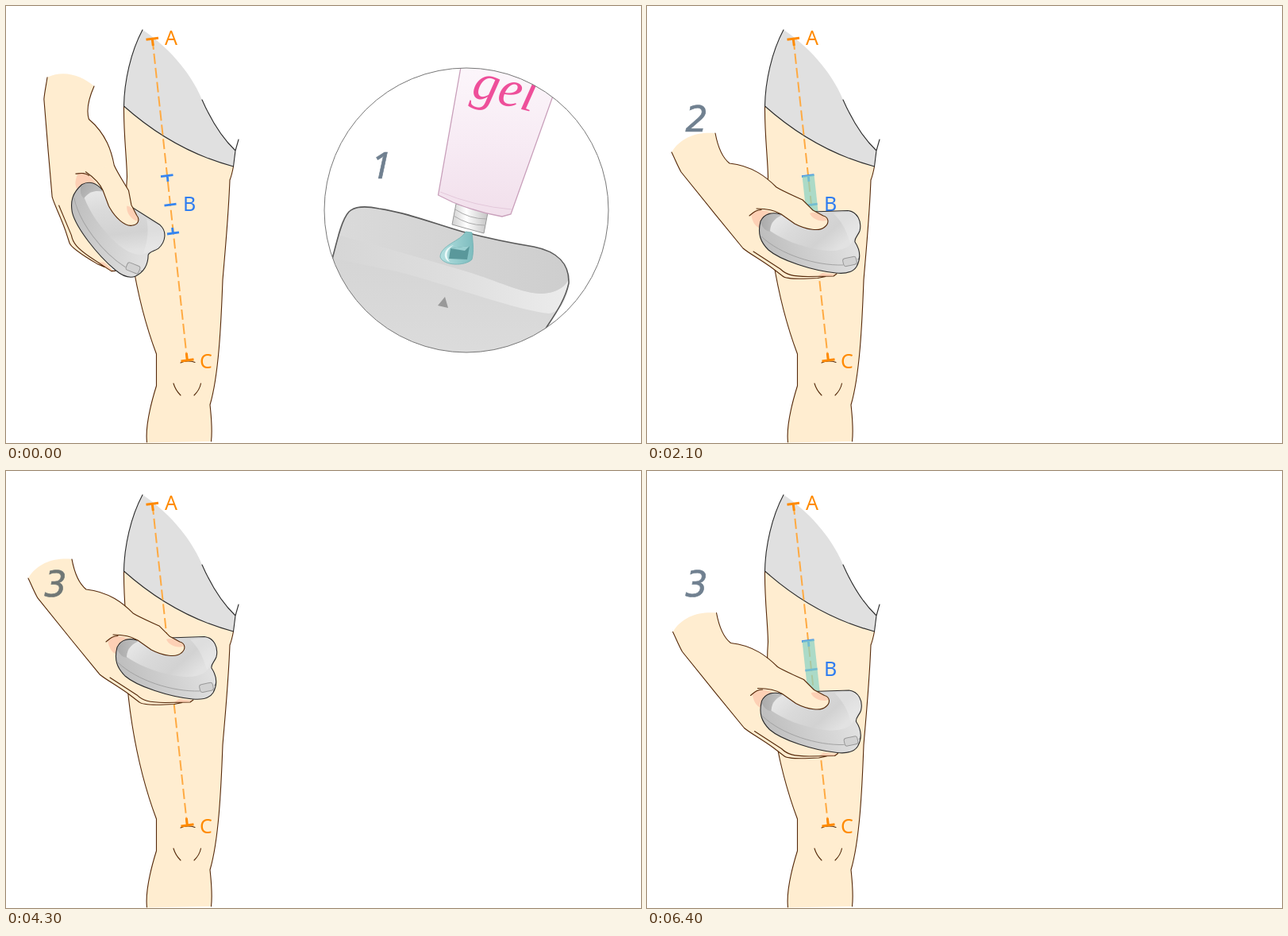
An HTML page that plays this animation: 800 by 550 pixels, repeating every 6500 ms.

```html
<!DOCTYPE html>
<html lang="en">
<head>
<meta charset="utf-8">
<title>Gel application steps</title>
<style>
  html, body { margin: 0; width: 100%; height: 100%; overflow: hidden; background: #fff; }
  svg { display: block; width: 100vw; height: 100vh; }
  .line { fill: none; stroke: #55290a; stroke-width: 1.1; stroke-linecap: round; stroke-linejoin: round; }
  .dark { fill: none; stroke: #2b2b2b; stroke-width: 1.1; stroke-linecap: round; stroke-linejoin: round; }
  .skin { fill: #ffedd0; }
  .pink { fill: #fdd0b5; }
  .label { font: 25px "Noto Sans", "Open Sans", sans-serif; fill: #ff8a00; }
  .digit { font: italic 44px "DejaVu Sans", sans-serif; fill: #708090; stroke: #708090; stroke-width: .7; mix-blend-mode: multiply; }
  .orange { fill: none; stroke: #ff8a00; stroke-width: 3; }
  .blue { fill: none; stroke: #3585f0; stroke-width: 2.8; }
  .rim { fill: none; stroke: #777; stroke-width: 1; }
</style>
</head>
<body>
<svg viewBox="0 0 800 550" preserveAspectRatio="none">
  <defs>
    <clipPath id="lens"><circle cx="580" cy="257" r="179"/></clipPath>
    <linearGradient id="shell" x1="0" x2="1" y1=".6" y2=".4">
      <stop offset="0" stop-color="#bcbcbc"/><stop offset=".5" stop-color="#d0d0d0"/><stop offset="1" stop-color="#e4e4e4"/>
    </linearGradient>
    <linearGradient id="shine" x1="0" x2="1" y1="0" y2=".5">
      <stop offset="0" stop-color="#ececec"/><stop offset=".4" stop-color="#dadada"/>
      <stop offset=".75" stop-color="#d2d2d2"/><stop offset="1" stop-color="#e2e2e2"/>
    </linearGradient>
    <linearGradient id="notch" x1="0" x2="1">
      <stop offset="0" stop-color="#aaa"/><stop offset="1" stop-color="#c4c4c4"/>
    </linearGradient>
    <linearGradient id="tube" x1="0" x2="0" y1="0" y2="1">
      <stop offset="0" stop-color="#fdf8fc"/><stop offset=".55" stop-color="#f7ebf4"/><stop offset="1" stop-color="#f1dfeb"/>
    </linearGradient>
    <linearGradient id="cap" x1="0" x2="1">
      <stop offset="0" stop-color="#d0d0d0"/><stop offset=".4" stop-color="#fff"/><stop offset="1" stop-color="#c4c4c4"/>
    </linearGradient>
    <linearGradient id="top" x1="0" x2="1">
      <stop offset="0" stop-color="#dadada"/><stop offset="1" stop-color="#cecece"/>
    </linearGradient>
    <linearGradient id="band" x1="0" x2="1">
      <stop offset="0" stop-color="#d6d6d6"/><stop offset=".5" stop-color="#dedede"/><stop offset="1" stop-color="#ececec"/>
    </linearGradient>
    <linearGradient id="under" x1="0" x2="0" y1="0" y2="1">
      <stop offset="0" stop-color="#d2d2d2"/><stop offset="1" stop-color="#dcdcdc"/>
    </linearGradient>
    <linearGradient id="drop" x1="0" x2="1">
      <stop offset="0" stop-color="#b4e0e0"/><stop offset="1" stop-color="#7dbcbe"/>
    </linearGradient>
    <linearGradient id="back" x1="0" x2="1" y1="0" y2=".6">
      <stop offset="0" stop-color="#f0f0f0"/><stop offset="1" stop-color="#dedede"/>
    </linearGradient>
    <linearGradient id="face" x1=".6" x2=".4" y1="0" y2="1">
      <stop offset="0" stop-color="#dadada"/><stop offset=".5" stop-color="#e6e6e6"/><stop offset="1" stop-color="#f4f4f4"/>
    </linearGradient>
    <linearGradient id="edge" x1="0" x2="1">
      <stop offset="0" stop-color="#e2e2e2"/><stop offset=".4" stop-color="#f7f7f7"/>
      <stop offset=".75" stop-color="#e0e0e0"/><stop offset="1" stop-color="#f2f2f2"/>
    </linearGradient>
    <linearGradient id="press" x1="0" x2="0" y1="0" y2="1">
      <stop offset="0" stop-color="#b4664e"/><stop offset="1" stop-color="#dfb29f"/>
    </linearGradient>
  </defs>

  <!-- leg -->
  <path class="skin" d="M148.5 126C148 160 152 190 152.5 215C148 270 162 365 189.5 438V478C178 515 176 535 177.5 549.5L258.5 548C260 535 259 520 257 502C268 465 271 400 273 345C275 320 280 270 282 219C284 214 285 210 286.5 202C230 187 185 158.500 148.5 126Z"/>
  <path fill="#e0e0e0" d="M172 30C157 58 149 95 148.5 126C185 158.500 230 187 286.5 202L289 182C272 166 258 143 247 118C232 81 200 48 172 30Z"/>
  <path class="line" d="M148.5 126C148 160 152 190 152.5 215C148 270 162 365 189.5 438V478C178 515 176 535 177.5 549M286.5 202C285 210 284 214 282 219C280 270 275 320 273 345C271 400 268 465 257 502C259 520 260 535 258.5 548"/>
  <path class="line" d="M220 449C225 446.5 233 446.5 238 448.5M211 475C213 482 216 486 220 490M245.5 475C244 483 240 487 237 490"/>
  <path class="dark" d="M172 30C157 58 149 95 148.5 126C185 158.500 230 187 286.5 202L289 182L293 168M289 182C272 166 258 143 247 118"/>

  <!-- measuring line -->
  <path d="M184.5 42L228 444" fill="none" stroke="#ffaa42" stroke-width="2" stroke-dasharray="13 5"/>
  <path class="orange" d="M176.5 42.2L192 40.3M184.3 41.5L185.3 50M220.5 447L236.5 444.8M228.3 445.5L227.3 437"/>
  <path class="blue" d="M195 214.7L210.5 212.7M203.3 214L204 221M199.5 251.2L214.5 249.2M203 287L218 284.8M210.3 286L209.5 279"/>
  <text class="label" x="200" y="49">A</text>
  <text class="label" x="223" y="258" style="fill:#2f7df0">B</text>
  <text class="label" x="244" y="456">C</text>
  <path id="gel" fill="#8bd3c4" fill-opacity=".72"/>

  <!-- hand with device -->
  <g id="hand">
    <path class="skin" d="M28 135C40 115 62 109 83 111C86 127 92 142 101 149C130 152 148 167 160 180L193 195L206 209L200 235L165 255L235 291C215 294 180 296 171 293L155 281C140 270 125 262 118 256C95 228 60 185 40 160C35 151 32 143 28 135Z"/>
    <path class="pink" d="M128 213C132 207 142 206 154 211L148 226L140 231C132 228 130 222 128 213Z"/>
    <path class="pink" d="M212 291L218 287L236 289Q230 292 212 291Z"/>
    <path class="line" d="M28 135C32 143 35 151 40 160C60 185 95 228 118 256C125 262 140 270 155 281L168 291C172 295 196 294.5 212 293.5L222 291.5M131 260L165 282C172 289 180 291.5 200 291.5L232 291L236 288"/>
    <path class="line" d="M126 215C131 211 134 207.5 141 207.5"/>
    <path fill="url(#shell)" d="M205 210L250 208.5C262 210 268 222 265 234C263 240 258 243 259 248C265 257 267 268 261 279C256 287 245 288 235 287C205 284 165 271 150 258C140 248 136 238 140 222C145 212 155 210 165 213Z"/>
    <path fill="url(#notch)" d="M140 224C145 213 155 210 168 213L154 224L152 235Q144 234 140 224Z"/>
    <path fill="url(#shine)" d="M152 234C153 222 160 217 168 214L206 210L249 210C262 213 265 224 262 234C258 242 256 246 255 249C250 257 235 261 216 258C190 254 168 245 152 234Z"/>
    <path fill="#ececec" fill-opacity=".45" d="M232 212L249 210C262 213 265 224 262 234C256 244 257 248 253 250C249 236 244 224 232 212Z"/>
    <path fill="none" stroke="#a3a3a3" d="M141 241C165 264 210 278 244 277M262 270L265 268.5"/>
    <rect x="244" y="267.5" width="17" height="10" rx="3" fill="#d2d2d2" stroke="#999" transform="rotate(-12 252.5 272.5)"/>
    <path class="dark" d="M205 210L250 208.5C262 210 268 222 265 234C263 240 258 243 259 248C265 257 267 268 261 279C256 287 245 288 235 287C205 284 165 271 150 258C140 248 136 238 140 222C145 212 155 210 165 213"/>
    <path class="skin" d="M135 206C150 206 158 208 166 213L183 225C198 233 215 235 221 229C227 224 226 217 219 215L206 208L193 195C180 189 168 184 160 179Z"/>
    <path class="pink" d="M202 212C208 209 219 214 224.5 220C220 223 207 222 202 212Z"/>
    <path class="line" d="M83 111C86 127 92 142 101 149C130 152 148 167 160 179C168 184 180 189 193 195L206 208L219 215C226 217 227 224 221 229C215 235 198 233 183 225L166 213C158 208 150 206 135 206"/>
  </g>
  <text id="digit" class="digit" x="48.5" y="158">2</text>

  <!-- gel on the device -->
  <g id="step1">
    <g clip-path="url(#lens)">
      <path fill="url(#under)" d="M408 330C416 300 422 270 432 259C440 251 455 252 470 255C505 260 540 274 575 284C610 293 640 299 665 303C695 309 710 325 709 349C704 372 690 390 676 412L640 450H420Z"/>
      <path fill="url(#band)" d="M419 286C470 302 540 322 580 334C620 346 650 362 675 362C695 361 706 352 709 343C710 365 700 385 684 387C640 382 560 352 500 336C460 327 430 322 412 317Z"/>
      <path fill="url(#top)" d="M418 288C422 272 426 265 432 259C440 251 455 252 470 255C505 260 540 274 575 284C610 293 640 299 665 303C695 309 709 325 709 343C706 352 695 361 675 362C650 362 620 346 580 334C540 322 470 302 418 288Z"/>
      <path fill="none" stroke="#5a5a5a" stroke-width="1.6" d="M408 330C416 300 422 270 432 259C440 251 455 252 470 255C505 260 540 274 575 284C610 293 640 299 665 303C695 309 710 325 709 349C704 372 690 390 676 412"/>
      <path fill="#999" d="M553 366L544 377L557 380Z"/>
      <path fill="url(#cap)" stroke="#999" d="M567 249L607 260L602 286L562 275Z"/>
      <path fill="none" stroke="#aaa" d="M566 256Q584 268 605 268M564 264Q582 276 603 276"/>
      <path fill="url(#tube)" stroke="#c9a0bb" stroke-width="1.3" d="M576 60L544.5 238L563 247Q592 259 625 265L636 262L708 60Z"/>
      <path fill="none" stroke="#e3c8da" d="M547 234Q590 252 637 256"/>
      <text transform="translate(585 114) rotate(14)" font-family="Liberation Serif, serif" font-style="italic" font-size="66" fill="#ee4f9a">gel</text>
      <path fill="url(#drop)" stroke="#6fb0b2" stroke-width=".8" d="M579 284C573 296 547 301 547 316C551 327 578 328 587 319C590 308 588 296 587 285Z"/>
      <path fill="#5a989b" d="M560 305L584 302L581 319L558 318Z"/>
      <path fill="#9bd0d1" d="M560 305L584 302L578 308Z"/>
      <path fill="#e9f8f7" d="M564 301C555 306 553 315 559 322C550 319 550 305 564 301Z"/>
    </g>
    <circle class="rim" cx="580" cy="257" r="179"/>
    <text x="460" y="217" font-family="Noto Sans, Open Sans, sans-serif" font-style="italic" font-size="46" fill="#708090" stroke="#708090" stroke-width=".7">1</text>
  </g>

  <!-- finger on the button -->
  <g id="step3">
    <g clip-path="url(#lens)">
      <path fill="url(#back)" d="M578 78C520 122 434 225 417 340L410 440L494 414C545 398 620 381 680 377C695 376 704 370 708 362L690 266C679 240 672 200 668 150C667 130 668 110 665 97L650 70Z"/>
      <path fill="url(#face)" d="M450 398C451 320 500 180 588 108C610 94 632 96 634 115C637 165 630 220 648 262C660 300 675 330 690 346C610 355 520 375 450 398Z"/>
      <path fill="url(#edge)" d="M460 396C540 370 620 355 698 345L708 362C704 370 695 376 680 377C620 381 545 398 494 414Z"/>
      <path fill="none" stroke="#666" stroke-width="1.6" d="M578 78C520 122 434 225 417 340M665 97C668 110 667 130 668 150C672 200 679 240 690 266M490 415C545 398 620 381 680 377C695 376 704 370 708 362"/>
      <path fill="#bcbcbc" d="M558 374L569 372L565 383Z"/>
      <path stroke="#444" stroke-width="3.5" d="M555 394.5L580 390.5"/>
      <circle cx="578" cy="262" r="25" fill="#fff"/>
      <circle cx="578" cy="262" r="21.5" fill="url(#press)"/>
      <path fill="#fdefe4" stroke="#e9bba9" stroke-width="1.2" d="M548 258C548 246 562 245 577 247C620 250 655 257 690 265C725 275 745 297 756 312L720 376C680 345 640 305 610 292C590 283 548 278 548 258Z"/>
      <path fill="#fddccb" d="M549 258C549 247 562 246 577 248L606 250.5C623 258 623 280 608 290C588 282 549 277 549 258Z"/>
      <path fill="none" stroke="#0030b4" stroke-width="5" stroke-linecap="round" d="M561 314.5Q574 319 588.5 316.5"/>
    </g>
    <circle class="rim" cx="580" cy="257" r="179"/>
  </g>
</svg>

<script>
const LOOP = 6500, STEP = 100;
const byId = id => document.getElementById(id);
const hand = byId("hand"), gel = byId("gel"), digit = byId("digit");
const step1 = byId("step1"), step3 = byId("step3");

// time, x, y, angle of the hand
const poses = [
  [700, 112, 213, 34.3],
  [1300, 143.9, 201.2, 6.4],
  [1500, 146.8, 200, 0],
  [2100, 150, 252, 0],
  [2700, 109, 229, 9.7],
  [3500, 109, 229, 9.7],
  [3900, 146.1, 190.1, 0],
  [6400, 151.5, 270.5, 0]
];

const clamp = v => Math.max(0, Math.min(1, v));
const show = (el, on) => { el.style.display = on ? "" : "none"; };

function poseAt(t) {
  let i = 0;
  while (i < poses.length - 2 && t > poses[i + 1][0]) i++;
  const a = poses[i], b = poses[i + 1];
  const k = clamp((t - a[0]) / (b[0] - a[0]));
  return a.map((v, n) => v + (b[n] - v) * k);
}

function draw(time) {
  const t = Math.floor((time % LOOP) / STEP) * STEP;
  // the hand rests until 800 ms, when its first step shows
  const [, x, y, angle] = poseAt(t);
  hand.setAttribute("transform", `translate(${x} ${y}) rotate(${angle}) translate(-147 -203)`);

  const k = clamp((t - 1500) / 600);
  const dx = 8 * k, dy = 73 * k;
  gel.setAttribute("d", `M195.5 214L210.5 212L${210.5 + dx} ${212 + dy}L${195.5 + dx} ${214 + dy}Z`);
  show(gel, k > 0);

  show(step1, t < 900);
  show(step3, t >= 2700 && t < 3700);
  show(digit, t >= 1500);
  digit.textContent = t < 2700 ? "2" : "3";
}

const start = performance.now();
function tick() {
  draw(performance.now() - start);
  requestAnimationFrame(tick);
}
draw(0);
requestAnimationFrame(tick);
</script>
</body>
</html>
```
